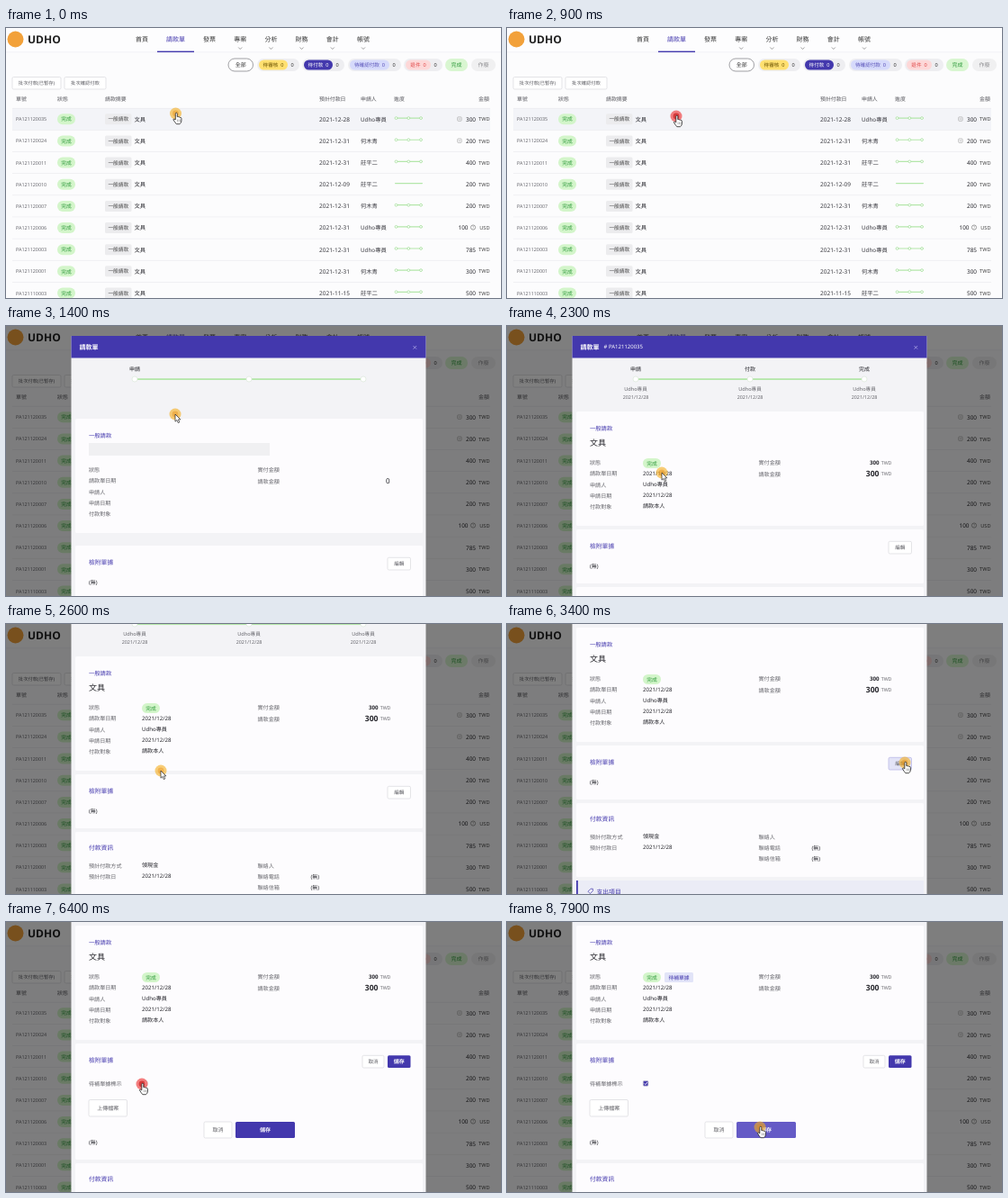
An HTML page for the animation above (8000 ms loop, 550 by 300 pixels).

```html
<!DOCTYPE html>
<html>
<head>
<meta charset="utf-8">
<title>請款單</title>
<style>
html, body { margin: 0; width: 100%; height: 100%; overflow: hidden; background: #fcfcfd; }
svg { display: block; width: 100%; height: 100%; }
text { font-family: "Noto Sans", "Noto Sans CJK TC", "Noto Sans CJK", sans-serif; text-rendering: geometricPrecision; white-space: pre; }
</style>
</head>
<body>
<svg id="stage" viewBox="0 0 550 300"></svg>
<script>
const PURPLE = '#4338ad', INK = '#25252b', GREY = '#66666c', CARD = '#fdfcfe';
const LOOP = 8000, STEP = 100, DIM = 0.5;

// Markup helpers; text y is the vertical centre of the line.
const text = (x, y, str, size = 6, fill = INK, anchor = 'start', weight = 400) =>
  `<text x="${x}" y="${(y + size * 0.37).toFixed(2)}" font-size="${size}" fill="${fill}" text-anchor="${anchor}" font-weight="${weight}">${str}</text>`;
const mid = (x, y, str, size, fill, weight) => text(x, y, str, size, fill, 'middle', weight);
const end = (x, y, str, size, fill, weight) => text(x, y, str, size, fill, 'end', weight);
const title = (x, y, str, size) => text(x, y, str, size, PURPLE, 'start', 500);
const box = (x, y, w, h, fill, r = 0, more = '') =>
  `<rect x="${x}" y="${y}" width="${w}" height="${h}" rx="${r}" fill="${fill}" ${more}/>`;
const dot = (x, y, r, fill, more = '') => `<circle cx="${x}" cy="${y}" r="${r}" fill="${fill}" ${more}/>`;
const path = (d, stroke, w = 0.7, fill = 'none') =>
  `<path d="${d}" stroke="${stroke}" stroke-width="${w}" fill="${fill}" stroke-linejoin="round"/>`;
const group = (id, body) => `<g id="${id}">${body}</g>`;
const edge = c => `stroke="${c}" stroke-width=".7"`;
const button = (x, y, w, h, label, size = 6, id = '') =>
  box(x, y, w, h, '#fff', 1.5, edge('#d9d9dd') + (id && ` id="${id}"`)) + mid(x + w / 2, y + h / 2, label, size, '#5c5c62');
const solid = (x, y, w, h, label, id) =>
  box(x, y, w, h, PURPLE, 1.5, `id="${id}"`) + mid(x + w / 2, y + h / 2, label, 6, '#fff', 700);
const done = (x, y, h) => box(x, y - h / 2, 20, h, '#d3f5ca', h / 2) + mid(x + 10, y, '完成', 5.8, '#2f9a3c');

function topBar() {
  let s = box(0, 0, 550, 27, '#fdfdfe') + box(0, 26.6, 550, 0.6, '#ececf0');
  s += dot(10.5, 12.5, 9, '#f2a13a') + text(24, 12.5, 'UDHO', 12, '#222', 'start', 700);
  const nav = ['首頁', '請款單', '發票', '專案', '分析', '財務', '會計', '帳號'];
  nav.forEach((name, i) => {
    const x = i < 2 ? 151 + i * 37.5 : 226 + (i - 2) * 34.2;
    s += mid(x, 12, name, 7, i === 1 ? PURPLE : '#333', 500);
    if (i > 2) s += path(`M${x - 2} 21.5l2 2 2-2`, '#777');
  });
  return s + box(168, 25.6, 41, 1.4, PURPLE);
}

function filters() {
  const pill = (x, w, inner, label, bg, fg) =>
    box(x, 34, w, 14, '#eeeef1', 7) + box(x + 2, 35.5, inner, 11, bg, 5.5) +
    mid(x + 2 + inner / 2, 41, label + '  0', 5.6, fg) + mid(x + w - 8, 41, '0', 5.6, '#333');
  return box(247, 34, 27.5, 14, '#fff', 7, edge('#77777d')) + mid(260.7, 41, '全部', 6, '#333') +
    pill(279, 47, 32, '待審核', '#ffe070', '#6a5200') +
    pill(329, 47, 32, '待付款', PURPLE, '#fff') +
    pill(380, 59, 44, '待確認付款', '#d6dafb', '#5750b8') +
    pill(442, 43, 28, '退件', '#fdd8d8', '#e04848') +
    box(488, 34, 25, 14, '#d9f6d1', 7) + mid(500.5, 41, '完成', 6, '#2f9a3c') +
    box(517, 34, 27, 14, '#f0f0f1', 7) + mid(530.5, 41, '作廢', 6, '#8a8a8e');
}

const people = ['Udho專員', '何木青', '莊平二'];
const rows = [
  ['20035', '12-28', 0, 300], ['20024', '12-31', 1, 200], ['20011', '12-31', 2, 400],
  ['20010', '12-09', 2, 200], ['20007', '12-31', 1, 200], ['20006', '12-31', 0, 100],
  ['20003', '12-31', 0, 785], ['20001', '12-31', 1, 300], ['10003', '11-15', 2, 500]
];

function table() {
  let s = button(7, 54.5, 54, 13.5, '批次付款(已暫存)', 5.3) + button(65, 54.5, 46, 13.5, '批次確認付款', 5.3);
  s += box(7, 70, 531, 230, '#fcfcfd') + box(7, 89, 531, 24.2, '#f3f4f8', 0, 'id="rowHover"');
  [['單號', 11], ['狀態', 57], ['請款摘要', 110], ['預計付款日', 348], ['申請人', 394], ['進度', 431], ['金額', 525]]
    .forEach(([name, x]) => s += text(x, 78.5, name, 5.9, '#55555b', 'start', 500));
  rows.forEach(([id, date, who, sum], i) => {
    const y = 101.3 + i * 24.15, usd = i === 5;
    s += box(7, y - 12.4, 531, 0.6, '#e9e9ed');
    s += text(11, y, 'PA1211' + id, 5.4, GREY) + done(57, y, 12);
    s += box(110, y - 6, 29.5, 12, '#ececee', 1.5) + mid(124.8, y, '一般請款', 5.7, '#444') + text(142.5, y, '文具', 6.3, INK, 'start', 500);
    s += text(348, y, '2021-' + date, 6.5, '#3a3a40') + text(394, y, people[who], 6.3, '#3a3a40');
    s += box(432, y - 1.8, 31, 1.2, '#b4e6aa', 0.6);
    if (i !== 3) for (const x of [433.5, 447.3, 461]) s += dot(x, y - 1.2, 1.4, '#fff', edge('#9bdb91'));
    s += end(usd ? 513.5 : 522, y, sum, 6.4, INK, 500) + end(537.5, y, usd ? 'USD' : 'TWD', 5.6, '#444');
    if (i < 2) s += box(501.7, y - 2.4, 4.4, 4.4, 'none', 0.8, edge('#aaa')) + path(`M502.8 ${y - 0.2}h2.2`, '#aaa');
    if (usd) s += dot(519, y - 0.5, 2.6, 'none', edge('#777')) + mid(519, y - 0.5, '?', 4, '#777');
  });
  return s;
}

function head() {
  let s = box(72.5, 11, 394, 24.5, PURPLE) + text(81.5, 23, '請款單', 7, '#fff', 'start', 700);
  s += group('billId', text(107.5, 23, '# PA121120035', 6, '#fff', 'start', 500)) + path('M452.5 22l3.6 3.6m0-3.6l-3.6 3.6', '#aaa3e6', 0.8);
  s += box(143, 58.2, 254, 1.8, '#b5e7aa');
  let later = '';
  ['申請', '付款', '完成'].forEach((name, i) => {
    const x = 143 + 127 * i, label = mid(x, 47.3, name, 6, INK, 500);
    s += dot(x, 59, 3, '#fff', edge('#dde8dc'));
    if (!i) s += label; else later += label;
    later += mid(x, 70, people[0], 5.6, GREY) + mid(x, 78.5, '2021/12/28', 5.4, GREY);
  });
  return s + group('stepInfo', later);
}

function info() {
  const labels = ['狀態', '請款單日期', '申請人', '申請日期', '付款對象'];
  const values = ['', '2021/12/28', people[0], '2021/12/28', '請款本人'];
  let s = title(92, 113.3, '一般請款', 6.3), v = text(92, 130, '文具', 9, INK, 'start', 500);
  labels.forEach((name, i) => {
    const y = 152 + i * 12.15;
    s += text(92, y, name, 6.1, GREY);
    v += text(151, y - 0.5, values[i], 6.1);
  });
  s += text(279.5, 152, '實付金額', 6.1, GREY) + text(279.5, 164.3, '請款金額', 6.1, GREY);
  v += done(151, 152.5, 11) + end(413.5, 152, '300', 6.2, INK, 600) + end(413.5, 164, '300', 8.6, INK, 600);
  for (const y of [152, 164.5]) v += end(427.5, y, 'TWD', 5.3, GREY);
  v += group('badge', box(175, 147, 32, 11, '#e2e4f8', 1.5) + mid(191, 152.5, '待補單據', 5.8, PURPLE));
  const ghost = box(92, 122, 201, 14, '#f0f0f2') + text(422, 164, '0', 8);
  return box(77, 95, 386, 127, CARD, 1.5) + s + group('infoData', v) + group('infoWait', ghost);
}

function receipts() {
  const view = button(424, 239.3, 25.5, 13.7, '編輯', 5.6, 'editBtn') + text(92, 267, '(無)', 6);
  const form = button(396, 239.3, 24, 13.7, '取消', 5.6) + solid(424, 239.3, 25.5, 13.7, '儲存', 'saveTop') +
    text(92, 270.5, '待補單據標示', 6.1, GREY) +
    box(151.3, 267.6, 5.6, 5.6, '#fff', 1, edge('#c9c9cf') + ' id="check"') +
    group('tick', path('M152.6 270.4l1.2 1.2 2-2.5', '#fff', 0.9)) +
    button(92, 288.5, 42.5, 18.5, '上傳檔案') + button(220, 313, 31, 18, '取消') +
    solid(255, 313, 66, 18, '儲存', 'saveMain') + text(92, 335.3, '(無)', 6);
  return box(77, 226, 386, 60, CARD, 1.5, 'id="cardBg"') +
    title(92, 244.2, '檢附單據', 6.8) + group('view', view) + group('form', form);
}

function payment() {
  let s = box(77, 290, 386, 82, CARD, 1.5) + title(92, 307.3, '付款資訊', 6.8);
  s += text(92, 327.7, '預計付款方式', 6.1, GREY) + text(151, 327.2, '領現金', 6.1);
  s += text(92, 339.7, '預計付款日', 6.1, GREY) + text(151, 339.2, '2021/12/28', 6.1);
  ['聯絡人', '聯絡電話', '聯絡信箱'].forEach((name, i) => {
    const y = 328 + i * 12;
    s += text(279.5, y, name, 6.1, GREY);
    if (i) s += text(338.5, y - 0.5, '(無)', 6);
  });
  s += box(77, 376, 386, 40, '#ebecf6') + box(77, 376, 1.8, 40, PURPLE);
  return s + path('M90 388.2l3-3h2.4v2.4l-3 3z', PURPLE) + title(99.5, 388, '支出項目', 6.8);
}

const arrow = path('M0 0v8.2l1.9-1.7 1.4 3.1 1.5-.7-1.4-3h2.5z', '#222', 0.7, '#fff');
const hand = path('M-1 .5q0-1.3 1-1.3t1 1.3v3.2q1.2-.6 1.6.3 1.1-.5 1.5.5 1.5-.3 1.5 1v2.5q0 2.7-2 3.7h-3.6q-1.3-1.5-3.5-5 .9-1.3 2.5.2z', '#222', 0.8, '#fff') +
  path('M1.2 6.5v2.6m1.5-2.6v2.6m1.5-2.6v2.6', '#555', 0.4);

const stage = document.getElementById('stage');
stage.innerHTML =
  box(0, 0, 550, 300, '#fcfcfd') + topBar() + filters() + table() +
  box(0, 0, 550, 300, '#000', 0, 'id="mask"') +
  group('modal', box(72.5, 11, 394, 620, '#f3f3f6') + head() + group('info', info()) +
    group('lower', receipts() + group('payment', payment()))) +
  group('cursor',
    dot(0, 0, 6.5, '#f5ae1c', 'id="glow"') + dot(0, 0, 3.4, '#e58a10', 'id="core"') +
    group('arrow', arrow) + group('hand', hand));

const el = {};
stage.querySelectorAll('[id]').forEach(n => el[n.id] = n);

const clamp = v => Math.max(0, Math.min(1, v));
const ramp = (t, a, b) => clamp((t - a) / (b - a));
const ease = p => p * p * (3 - 2 * p);
const within = (t, a, b) => t >= a && t < b;
const show = (id, on) => el[id].setAttribute('display', on ? 'inline' : 'none');
const fill = (id, c) => el[id].setAttribute('fill', c);
const move = (id, x, y) => el[id].setAttribute('transform', `translate(${x} ${y})`);

// time, x, y
const route = [
  [0, 188.5, 95], [900, 188, 98], [1500, 188, 98], [2100, 172, 163], [2800, 172, 163],
  [3300, 442, 154], [4200, 442, 154], [4700, 441, 156], [5000, 441, 156],
  [5900, 151, 180], [7200, 151, 180], [7900, 281, 228], [LOOP, 281, 228]
];
const clicks = [[900, 1200], [3900, 4100], [6300, 6600]];

function pointer(t) {
  const i = route.findIndex((k, n) => n && t < k[0]);
  const [a, x, y] = route[i - 1], [b, x2, y2] = route[i];
  const p = ease(ramp(t, a, b));
  return [x + (x2 - x) * p, y + (y2 - y) * p];
}

function draw(t) {
  const loaded = t >= 1500, edit = t >= 4200, checked = t >= 6500;
  const fade = ramp(t, 960, 1300);
  el.mask.setAttribute('opacity', t < 1000 ? 0 : DIM * fade);
  el.modal.setAttribute('opacity', t < 1000 ? 0 : fade);
  move('modal', 0, -91 * ease(ramp(t, 2300, 2800)));
  show('rowHover', t < 1300);

  for (const id of ['billId', 'stepInfo', 'infoData']) show(id, loaded);
  show('infoWait', !loaded);
  move('info', 0, loaded ? 0 : 8);
  move('lower', 0, loaded ? 0 : 18);

  show('view', !edit);
  show('form', edit);
  el.cardBg.setAttribute('height', edit ? 129 : 60);
  move('payment', 0, edit ? 69 : 0);
  show('tick', checked);
  fill('check', checked ? PURPLE : '#fff');
  show('badge', t >= 6600);

  const [x, y] = pointer(t);
  const over = (x1, y1, x2, y2) => x >= x1 && x <= x2 && y >= y1 && y <= y2;
  const onTop = t > 2800 && over(424, 148, 450, 162);
  const onMain = edit && over(255, 222, 321, 240);
  fill('editBtn', onTop ? '#e2e3f7' : '#fff');
  el.editBtn.setAttribute('stroke', onTop ? '#b5b2e4' : '#d9d9dd');
  fill('saveTop', onTop ? '#655bc6' : PURPLE);
  fill('saveMain', onMain ? '#655bc6' : PURPLE);

  const pressed = clicks.some(([a, b]) => within(t, a, b));
  const pointing = t < 1000 || onTop || onMain || (edit && over(149, 175, 159, 183));
  move('cursor', x.toFixed(2), y.toFixed(2));
  move('hand', 0.8, 0);
  fill('glow', pressed ? '#ef3b3b' : '#f5ae1c');
  fill('core', pressed ? '#c81f1f' : '#e58a10');
  el.glow.setAttribute('opacity', pressed ? 0.65 : 0.6);
  el.core.setAttribute('opacity', pressed ? 0.7 : 0.4);
  show('hand', pointing);
  show('arrow', !pointing);
}

const start = performance.now();
function tick() {
  const t = Math.max(0, performance.now() - start) % LOOP;
  draw(Math.floor(t / STEP) * STEP);
  requestAnimationFrame(tick);
}
tick();
</script>
</body>
</html>
```
